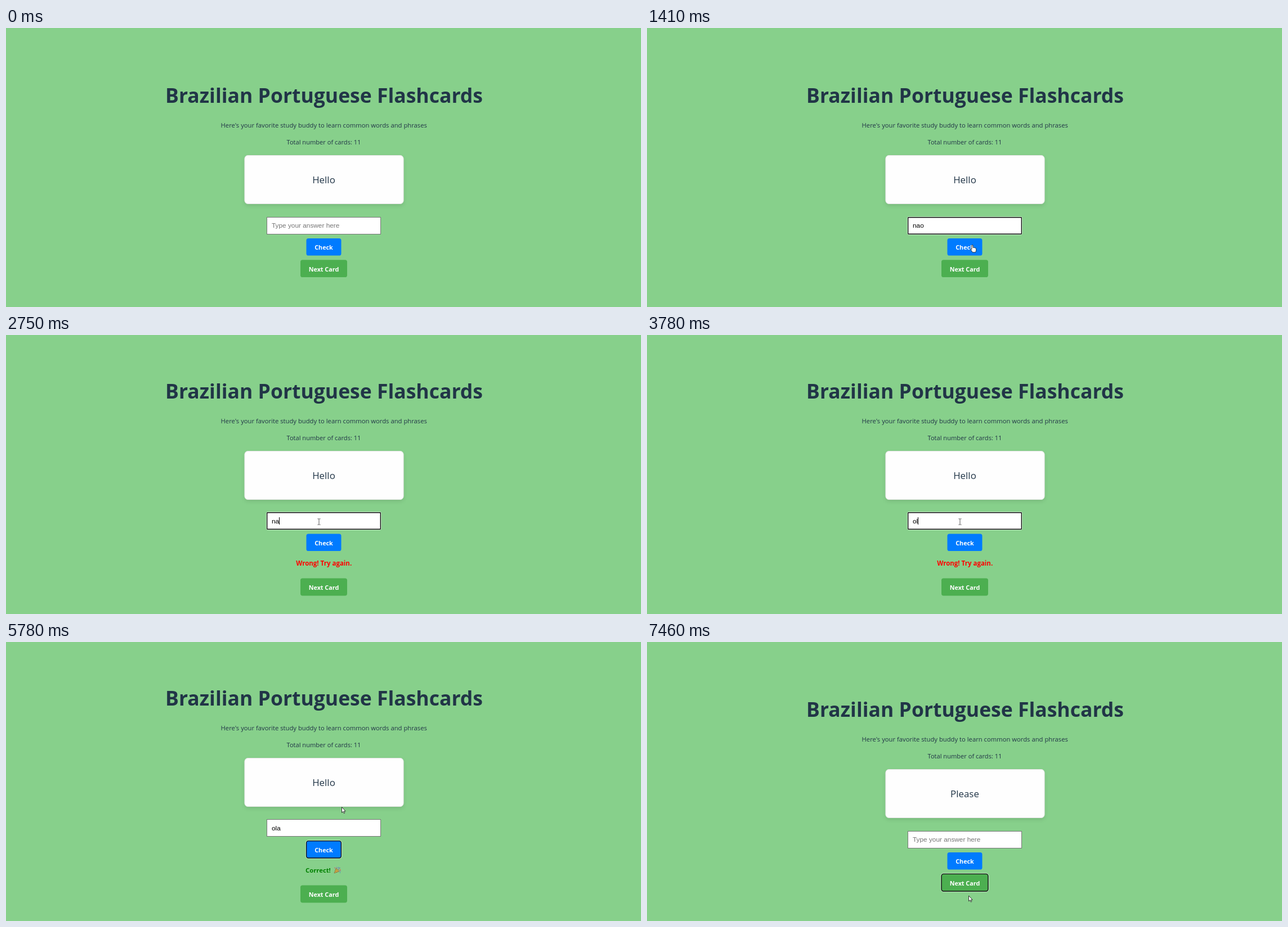
Animation of 1128x496 px, one loop 8 s. Source, as an HTML page:

```html
<!DOCTYPE html>
<html lang="en">
<head>
<meta charset="utf-8">
<title>Flashcards</title>
<style>
  html, body { margin: 0; width: 100%; height: 100%; overflow: hidden; background: #87d08b; }
  svg { display: block; width: 100%; height: 100%; }
  text { font: 11.25px "Open Sans", "Noto Sans", sans-serif; fill: #213547; }
  .mid { text-anchor: middle; }
  #title { font-size: 35.5px; font-weight: 700; }
  #total { font-size: 11.1px; }
  #word { font-size: 16.9px; }
  #answer { font: 11.84px "Liberation Sans", Arial, sans-serif; fill: #000; }
  #answer.hint { fill: #757575; }
  .label { font-size: 10.8px; font-weight: 700; fill: #fff; }
  .message { font-size: 11.5px; font-weight: 700; fill: #f00; }
  .good { font-size: 11.3px; fill: #008000; }
  .card { fill: #fefefe; filter: drop-shadow(0 3px 3px rgba(0, 0, 0, .1)); }
  .card-edge { fill: none; stroke: #ccc; stroke-opacity: .5; }
  .field { fill: #fff; stroke: #767676; }
  .halo { fill: none; stroke: #fff; stroke-opacity: .5; }
  .edge { fill: none; stroke: #101010; stroke-width: 1.4; }
  .pointer { fill: #fff; stroke: #222; stroke-width: .9; stroke-linejoin: round; }
  #ghost { fill: #6da672; }
</style>
</head>
<body>
<svg viewBox="0 0 1128 496">
  <!-- data-dy: offset applied while a message is shown -->
  <g data-dy="-20">
    <text id="title" class="mid" x="565" y="133">Brazilian Portuguese Flashcards</text>
    <text class="mid" x="564.7" y="177.3">Here's your favorite study buddy to learn common words and phrases</text>
    <text id="total" class="mid" x="564.5" y="207">Total number of cards: 11</text>
    <rect class="card" x="423.5" y="226" width="283" height="87" rx="6.5"/>
    <rect class="card-edge" x="424" y="226.5" width="282" height="86" rx="6"/>
    <text id="word" class="mid" x="564.5" y="276.4"></text>
  </g>

  <g data-dy="-21">
    <rect class="field" x="463.5" y="336.5" width="202" height="30"/>
    <rect id="inputHalo" class="halo" x="462.5" y="335.5" width="204" height="32" rx="2.5"/>
    <rect id="inputRing" class="edge" x="463.7" y="336.7" width="201.6" height="29.6" rx="1.2"/>
  </g>
  <g data-dy="-20">
    <text id="answer" x="472" y="354.7"></text>
    <rect id="caret" y="344" width="1" height="13"/>
  </g>

  <g data-dy="-20.5">
    <rect x="533.5" y="374" width="62" height="30.6" rx="3.7" fill="#007bff"/>
    <g id="checkRing">
      <rect class="halo" x="532.4" y="372.9" width="64.2" height="32.8" rx="4.8"/>
      <rect class="edge" x="533.6" y="374.1" width="61.8" height="30.4" rx="3.7"/>
    </g>
    <text class="label mid" x="564.5" y="394.4">Check</text>
  </g>

  <text id="wrong" class="message mid" x="564.7" y="409.7">Wrong! Try again.</text>
  <g id="correct">
    <text class="message good" x="532" y="409.7">Correct!</text>
    <path d="M583 411L586 402.6Q590.5 404.5 591.7 408Z" fill="#d9ae45" stroke="#6d6a48" stroke-width=".7"/>
    <path d="M584.6 407l3 2.6M585.6 404.2l4 4" stroke="#7a6b3a" stroke-width=".7"/>
    <path d="M587 403q2-1 .6-3M590 405q1-3 4-3.4M591.5 407.5q2-1.5 3.3 0" fill="none" stroke="#8a5aa8" stroke-width="1"/>
    <circle cx="584.4" cy="401.6" r=".9" fill="#d0526b"/>
    <circle cx="591" cy="400.8" r=".9" fill="#3f87c9"/>
    <circle cx="593.6" cy="405" r=".9" fill="#e06c3a"/>
    <circle cx="593.4" cy="410" r=".8" fill="#3f87c9"/>
  </g>

  <g data-dy="20.3">
    <rect x="523" y="412.3" width="83" height="30.8" rx="3.7" fill="#4caf50"/>
    <g id="nextRing">
      <rect class="halo" x="521.9" y="411.2" width="85.2" height="33" rx="4.8"/>
      <rect class="edge" x="523.1" y="412.4" width="82.8" height="30.6" rx="3.7"/>
    </g>
    <text class="label mid" x="564.5" y="432.5">Next Card</text>
  </g>

  <path id="ghost" d="M574.5 427.5v9.8l2.3-2 1.5 3.4 1.5-.7-1.5-3.2h2.9z"/>
  <path id="arrow" class="pointer" d="M0 0v9.8l2.3-2 1.5 3.4 1.5-.7-1.5-3.2h2.9z"/>
  <path id="hand" class="pointer" d="M-1.1 .9Q0-.5 1.1 .9V5Q2.4 4.3 3.1 5.4Q4.5 4.8 5 6Q6.5 5.6 6.7 7.2V10Q6.4 12 5.4 13.5H.4Q-1 11.5-2.7 9Q-3.6 7.4-2.2 7.2L-1.1 8.2Z"/>
  <path id="beam" d="M-2.5-5.2H-.6L0-4.6.6-5.2H2.5M0-4.6V4.6M-2.5 5.2H-.6L0 4.6.6 5.2H2.5" fill="none" stroke="#444" stroke-width=".9"/>
</svg>
<script>
const LOOP = 8000;
const HINT = "Type your answer here";
const $ = id => document.getElementById(id);

// Each step lists only what changes; pointer is [shape, x, y].
const steps = [
  [0, { word: "Hello", text: "", message: "", focus: "", halo: false, caret: 0, pointer: [], ghost: false }],
  [70, { focus: "input", pointer: ["beam", 601, 343] }],
  [420, { halo: true }],
  [750, { caret: 472, pointer: ["beam", 596, 348] }],
  [1080, { text: "nao", caret: 491 }],
  [1410, { caret: 0, pointer: ["hand", 578, 385.3] }],
  [1760, { message: "wrong", focus: "check", halo: false, pointer: ["arrow", 574, 387.5] }],
  [2090, { focus: "input", pointer: ["beam", 556, 332] }],
  [2420, { halo: true }],
  [2750, { text: "na", caret: 485 }],
  [3090, { text: "", caret: 472 }],
  [3780, { text: "ol", caret: 481 }],
  [4110, { text: "ola", caret: 487 }],
  [4440, { caret: 0, pointer: ["beam", 556.5, 333] }],
  [4770, { pointer: ["hand", 566.5, 365.5] }],
  [5110, { message: "correct", focus: "check", halo: false, pointer: ["hand", 566.5, 368.3] }],
  [5780, { pointer: ["arrow", 596.5, 293.5] }],
  [6120, { pointer: ["hand", 594.5, 268.3] }],
  [6450, { word: "Olá", focus: "", pointer: ["hand", 592.3, 257.3] }],
  [6780, { pointer: ["arrow", 574.5, 427.5] }],
  [7120, { ghost: true, pointer: ["hand", 571.5, 451.3] }],
  [7460, { word: "Please", text: "", message: "", focus: "next", ghost: false, pointer: ["arrow", 571.5, 451] }]
];

let merged = {};
const scenes = steps.map(([start, change]) => ({ start, state: merged = { ...merged, ...change } }));
const shifted = document.querySelectorAll("[data-dy]");

function show(id, visible) {
  $(id).style.display = visible ? "" : "none";
}

function draw(s) {
  $("word").textContent = s.word;
  $("answer").textContent = s.text || HINT;
  $("answer").classList.toggle("hint", !s.text);
  for (const el of shifted)
    el.setAttribute("transform", `translate(0 ${s.message ? el.dataset.dy : 0})`);
  for (const name of ["input", "check", "next"]) show(name + "Ring", s.focus === name);
  for (const name of ["wrong", "correct"]) show(name, s.message === name);
  show("inputHalo", s.halo);
  show("ghost", s.ghost);
  show("caret", s.caret);
  $("caret").setAttribute("x", s.caret);
  const [shape, x, y] = s.pointer;
  for (const name of ["arrow", "hand", "beam"]) show(name, shape === name);
  if (shape) $(shape).setAttribute("transform", `translate(${x} ${y})`);
}

let current;
function tick() {
  const time = performance.now() % LOOP;
  const scene = scenes.findLast(({ start }) => start <= time);
  if (scene !== current) draw((current = scene).state);
  requestAnimationFrame(tick);
}
tick();
</script>
</body>
</html>
```
